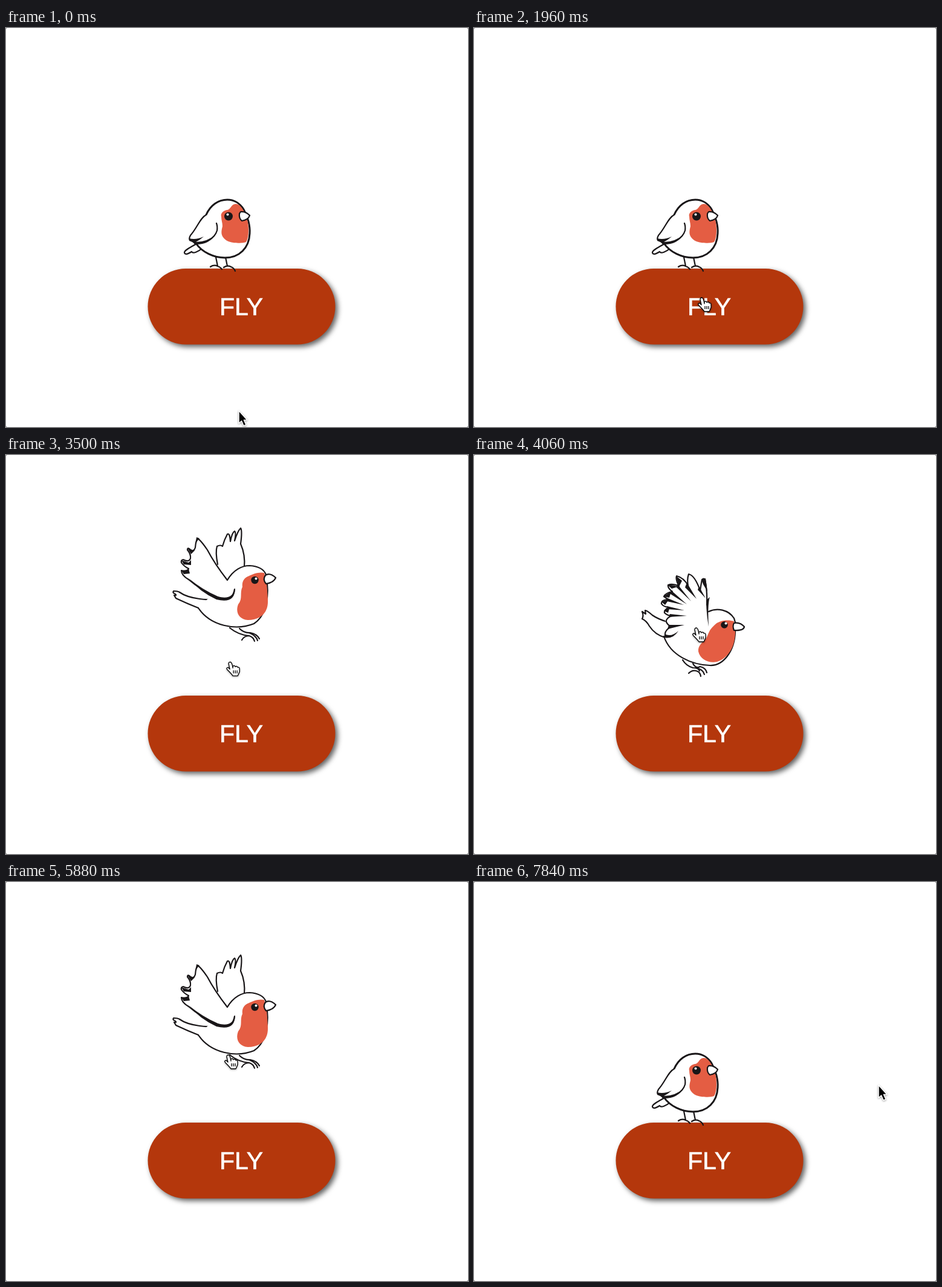
An HTML page that plays this animation: 764 by 660 pixels, repeating every 8 s.

```html
<!DOCTYPE html>
<html lang="en">
<head>
<meta charset="utf-8">
<title>Fly</title>
<style>
html, body { margin: 0; width: 100%; height: 100%; overflow: hidden; background: #666; }
svg { display: block; width: 764px; height: 660px; background: #fff; border-radius: 2px; }
.button { fill: #b4370c; filter: drop-shadow(4px 4px 4px rgba(0,0,0,.62)); }
text { font: 41px "Liberation Sans", Arial, sans-serif; fill: #fff; stroke: #fff; stroke-width: .7; }
.bird { visibility: hidden; stroke-linecap: round; stroke-linejoin: round; }
.line { fill: none; stroke: #191618; stroke-width: 2.2; }
.white { fill: #fff; stroke: #191618; stroke-width: 2.2; }
.blank { fill: #fff; }
.ink { fill: #191618; }
.red { fill: #e45d43; }
.bold { stroke-width: 3; }
.cursor { filter: drop-shadow(0 1px 1.5px rgba(0,0,0,.4)); stroke-linejoin: round; }
</style>
</head>
<body>
<svg viewBox="0 0 764 660">
  <rect class="button" x="234.500" y="398" width="310" height="125.500" rx="62.750"/>
  <text x="353" y="475">FLY</text>

  <g class="bird" id="perch">
    <path class="line" d="M347 379L350 394M338 395Q344 391 350 394Q354 395 357 399M363 379L366 394M360 396Q366 392 372 395Q377 397 379 402"/>
    <path class="white" d="M315 357C306 362 294 368 295 372C297 376 302 373 307 370C309 374 318 370 325 364"/>
    <path class="white bold" d="M331 309C338 293 351 284 366 284C377 284 387 290 393 300C400 312 404 328 403 340C402 364 386 380 362 380C344 380 324 371 314 356"/>
    <path class="red" d="M356 312C354 306 361 301 366 301C372 300 372 291 380 291C388 291 396 304 400 322C402 335 401 348 397 354C390 357 370 356 364 351C354 344 356 336 358 328C358 322 356 318 356 312"/>
    <path class="blank" d="M331 309C321 314 314 333 305 343L303 351L312 357C328 357 345 350 349 335L348 323Z"/>
    <path class="line" d="M331 309C321 314 316 331 305 343Q302 349 304 351M312 356C328 357 345 349 349 335Q350 328 348 323"/>
    <path class="ink" d="M303 348Q314 351 327 345Q320 351 314 354Q333 354 347 341Q336 359 312 358Q310 354 303 352Z"/>
    <circle class="ink" cx="368" cy="311.500" r="7"/><circle class="blank" cx="366.500" cy="308.500" r="2"/>
    <path class="white" d="M388 304Q396 303 403 310Q401 317 390 319Q385 315 386 307Z"/>
  </g>

  <g class="bird" id="spread">
    <path class="line" d="M336 280L351 304M332 301Q341 297 350 304Q357 304 366 308M347 304l4 5M362 281L378 298M359 294Q370 292 378 297Q390 293 396 300M378 297Q382 303 384 310"/>
    <path class="white" d="M322 271L308 290Q304 298 308 297L312 293Q311 299 314 298L328 276"/>
    <path class="white" d="M395 201Q405 198 415 200Q425 201 428 196Q435 197 432 201Q436 203 441 199Q446 199 441 204Q447 206 453 203Q456 205 451 207Q460 209 468 206Q469 210 460 214Q466 215 467 218Q462 224 455 224Q461 228 460 231Q452 233 445 231Q449 235 444 239Q435 240 429 237"/>
    <path class="ink" d="M411 238Q408 245 414 253L409 250Q407 255 401 254Q409 249 411 238M445 231Q445 237 431 238Q441 242 447 237Z"/>
    <path class="white" d="M327 207C335 188 352 177 370 177C384 177 393 186 395 200C397 215 401 228 401 240C400 265 380 282 355 283C338 283 325 276 317 262"/>
    <path class="red" d="M362 199C360 190 366 184 374 185C378 186 380 191 388 190C394 191 394 200 393 204L398 221C402 235 400 250 397 257C380 264 352 262 343 254C334 246 335 236 342 231C348 226 352 220 350 212C344 207 344 203 349 202C355 199 360 203 362 199"/>
    <path class="blank" d="M340 210L305 202L267 215L261 235L290 253L315 262L336 222Z"/>
    <path class="line" d="M336 216Q341 214 343 210C330 207 318 207 305 201C299 198 297 194 291 194Q290 197 296 204Q288 203 277 198Q275 202 283 209Q274 209 267 206Q266 211 273 217Q266 219 254 222Q254 226 260 228Q256 232 259 238Q264 240 268 237Q267 243 272 245Q276 244 277 243Q277 249 281 252Q286 252 287 249Q288 255 292 256Q297 257 297 254Q300 262 306 260Q310 263 315 262"/>
    <path class="ink" d="M254 221L260 229L257 231ZM259 238l9-2-6 6ZM270 243l8-1-5 5ZM280 250l8-1-5 5Z"/>
    <circle class="ink" cx="371" cy="199" r="6.500"/><circle class="blank" cx="372" cy="196" r="1.800"/>
    <path class="white" d="M388 205Q382 209 382 213Q389 221 399 221Q401 215 397 209Q393 203 388 205Z"/>
  </g>

  <g class="bird" id="fan">
    <path class="line" d="M345 339Q351 349 362 352Q371 352 373 357M355 361Q362 354 370 358Q374 360 375 366M362 345Q367 354 374 350Q383 352 385 360M366 352Q379 354 381 363"/>
    <path class="white" d="M320 276Q305 272 295 265Q286 257 283 257L284 263L278 259Q281 266 278 271Q285 274 290 283Q299 297 316 302"/>
    <path class="white" d="M388 259C402 252 421 256 430 270Q434 280 432 292C431 325 412 349 390 348C360 347 325 332 314 300"/>
    <path class="red" d="M430 275C420 272 405 273 397 282C388 290 388 296 384 303C378 310 370 315 371 325C374 338 388 345 402 342C420 336 432 318 432 292L428 287Z"/>
    <path class="blank" d="M388 284L383 206L354 197L321 215L311 245L318 282L317 300L335 302L370 312Z"/>
    <path class="line" d="M385 248Q386 225 382 206Q380 203 377 206Q375 217 374 224Q365 199 355 197Q352 205 354 216Q347 203 335 200Q333 206 339 217Q328 212 321 215Q320 220 328 226Q317 228 314 234L321 239Q309 240 310 246Q313 251 322 252Q314 256 315 261Q320 266 327 266Q317 270 318 276Q320 281 326 284Q315 290 316 298"/>
    <path class="ink" d="M390 235Q386 246 388 284Q384 262 384 240ZM372 217L383 237L370 223ZM352 211L368 238L349 219ZM336 213L359 242L335 219ZM325 223L352 247L325 230ZM318 236L347 248L319 242ZM319 250L348 257L320 255ZM324 263L352 266L322 268ZM322 281L348 281L320 288ZM315 296Q326 302 338 291Q329 305 315 302ZM334 200l10 8-5 10ZM376 206l7-2 3 22-7-12ZM320 215q9-1 17 3l-10 3ZM313 234l13-8-3 10ZM310 243l13-5-7 10ZM314 258l10-7-3 10Z"/>
    <circle class="ink" cx="414" cy="281" r="5.800"/><circle class="blank" cx="416.500" cy="278.500" r="2"/>
    <path class="white" d="M430 278Q440 276 447 284Q446 291 430 290Q427 283 430 278Z"/>
  </g>

  <g class="bird" id="rise">
    <path class="line" d="M370 286Q385 298 402 299Q409 301 411 308M390 306Q394 299 402 299M386 287Q394 295 404 294Q415 296 419 304M402 294Q414 299 416 307"/>
    <path class="white" d="M350 181Q346 160 349 151Q355 148 358 151Q361 140 366 131Q370 128 371 143Q374 128 378 126Q381 128 378 142Q383 126 388 121Q391 125 388 147Q396 165 394 186"/>
    <path class="white" d="M318 253Q300 246 281 237L278 232Q283 233 280 230Q275 228 277 225Q284 225 287 227Q298 235 320 238Q338 241 345 236"/>
    <path class="white" d="M366 207C376 190 390 183 403 183C418 184 427 190 430 198C436 230 432 265 410 279C380 291 338 283 318 253"/>
    <path class="red" d="M427 195C418 193 408 197 402 200C392 203 390 212 391 218C386 228 392 238 384 247C379 260 385 272 400 273C420 273 434 262 433 240L431 213Z"/>
    <path class="blank" d="M366 207L333 157L317 138L304 175L302 206Q320 222 348 236Q375 243 379 222Z"/>
    <path class="line" d="M366 207Q345 180 333 157Q322 141 317 138Q314 141 313 153Q310 162 303 155Q300 153 300 157Q306 164 305 171Q303 178 293 173Q289 174 290 178Q294 184 302 188Q300 193 290 191Q290 199 302 206Q320 222 352 236Q375 243 378 222"/>
    <path class="ink" d="M302 204Q325 223 350 234Q375 241 379 220Q379 247 348 239Q320 226 302 204ZM313 150q3-9 7-12l-5-2ZM300 154q8 6 13 3l-7 7ZM290 174l12 4 4-4 0 8-12-1ZM290 191q8 3 12-3l2 8-10 1Z"/>
    <circle class="ink" cx="411.500" cy="207" r="6.200"/><circle class="blank" cx="413.500" cy="204.500" r="2"/>
    <path class="white" d="M429 199Q436 194 446 203Q443 211 430 213Q424 206 429 199Z"/>
  </g>

  <g class="cursor" id="cursor">
    <path id="arrow" fill="#000" stroke="#fff" stroke-width="1.500" d="M0 -1V20L4.500 16L8 24L12 22.500L8.500 14.500H14Z"/>
    <g id="hand" stroke="#000" stroke-width="1.300">
      <path fill="#fff" d="M-3 2Q-3 -1 0 -1Q2 0 3 4L4 9V6Q7 4 8 7Q11 5 12 8Q15 7 15 11V15Q14 18 12 22H4Q2 19 -5 12Q-8 9 -4 8L-1 11Z"/>
      <path d="M5 13v5M8 13v5M11 13v5"/>
    </g>
  </g>
</svg>
<script>
const LOOP = 8000, STEP = 70;
const el = id => document.getElementById(id);
const birds = document.querySelectorAll('.bird');

// start time, drawing, transform
const poses = [
  [0, 'perch'],
  [2240, 'rise', 'translate(0 85)'],
  [2660, 'spread'],
  [3150, 'rise'],
  [3570, 'spread', 'translate(-1 11)'],
  [4060, 'fan'],
  [4480, 'rise'],
  [4970, 'spread', 'translate(-1 11)'],
  [5390, 'fan'],
  [5880, 'rise'],
  [6300, 'spread', 'translate(-1 11)'],
  [6720, 'fan'],
  [7140, 'spread', 'translate(40 66) scale(.88 1.02)'],
  [7770, 'perch']
];

// time, x, y of the cursor tip
const track = [
  [0, 385, 634], [560, 379, 464], [1330, 379, 464], [1960, 377, 447],
  [2870, 377, 447], [3920, 368, 287], [6020, 368, 287],
  [6720, 625, 329], [6860, 656, 337], [7000, 669, 337], [LOOP, 669, 337]
];

const smooth = u => u * u * (3 - 2 * u);

function cursorAt(t) {
  const i = track.findIndex(k => k[0] > t);
  const [t0, x0, y0] = track[i - 1], [t1, x1, y1] = track[i];
  const u = smooth((t - t0) / (t1 - t0));
  return [x0 + (x1 - x0) * u, y0 + (y1 - y0) * u];
}

function draw(now) {
  const t = Math.floor(now % LOOP / STEP) * STEP;
  const [, name, move = ''] = poses.filter(p => p[0] <= t).pop();
  for (const b of birds) b.style.visibility = b.id === name ? 'visible' : 'hidden';
  el(name).setAttribute('transform', move);

  const pointing = t >= 1400 && t < 6300;
  el('hand').style.display = pointing ? '' : 'none';
  el('arrow').style.display = pointing ? 'none' : '';
  el('cursor').setAttribute('transform', `translate(${cursorAt(t)})`);
}

const start = performance.now();
function tick() {
  draw(performance.now() - start);
  requestAnimationFrame(tick);
}
tick();
</script>
</body>
</html>
```
